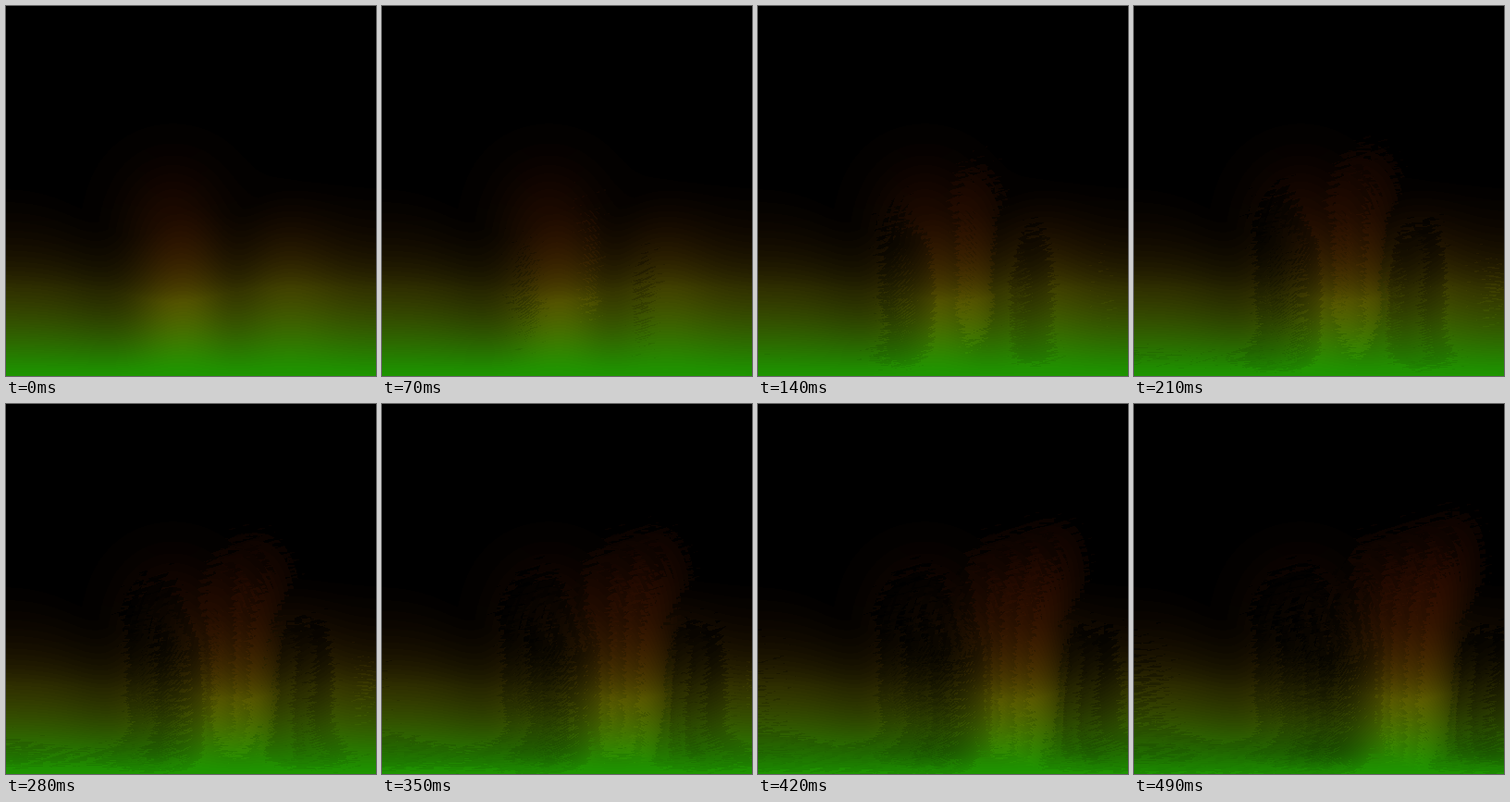
An HTML page with a canvas for the animation above (560 ms loop, 400 by 400 pixels).

```html
<!DOCTYPE html>
<html lang="en">
<head>
<meta charset="utf-8">
<title>Aurora</title>
<style>
  html, body { margin: 0; width: 100%; height: 100%; overflow: hidden; background: #000; }
  canvas { display: block; width: 100vw; height: 100vh; }
</style>
</head>
<body>
<canvas id="stage" width="400" height="400"></canvas>
<script>
const SIZE = 400, STEPS = 8, STEP_MS = 70;
const ctx = document.getElementById('stage').getContext('2d');

const bell = (d, width) => Math.exp(-d * d / (2 * width * width));
const plateau = (s, top) => Math.exp(-Math.pow(s / top, 5));

function hash(a, b) {
  const n = Math.sin(a * 127.1 + b * 311.7) * 43758.5453;
  return n - Math.floor(n);
}

// Values shared by a whole column at step k.
function columnAt(x, k) {
  const q = k / (STEPS - 1);
  const trough = bell(x - 135 - 13 * k, 45);
  const trough2 = bell(x - 245 - 18 * k, 25);
  const reach = 95 - 15 * q - 27 * trough - (14 + 6 * q) * trough2
    + 7 * q * bell(x - 10 - 12 * k, 30);
  return { q, reach, trough, ridge2: bell(x - 305 - 25 * k, 38) };
}

// Red and green of the light at height s above the ground.
function glow(x, s, k, { q, reach, trough, ridge2 }) {
  const lean = 6 * Math.pow(s / 260, 2);
  const d = x - 180 - k * (16.5 + lean);
  const ridge = bell(d, d < 0 ? 41 + 9 * q : 41 - 7 * q);
  const rise = 1 - Math.exp(-s / 40);

  let v = Math.max(0, 162 * Math.exp(-Math.pow(s / reach, 1.2)) - 12);
  v += rise * (41 + 19 * q) * ridge * plateau(s, 215 + 40 * q);
  v += rise * 20 * ridge2 * plateau(s, 175);
  v -= q * (22 + 14 * trough) * (1 - ridge) * bell(s - 20, 16);
  v = Math.max(0, Math.round(v / 3) * 3);

  const hue = 13 + 95 * Math.exp(-Math.pow(s / (120 - 20 * ridge), 1.6));
  return hue < 60 ? [v, v * hue / 60] : [v * (120 - hue) / 60, v];
}

// Light lingers until it has changed enough, leaving ragged trails.
function inertia(x, y) {
  const tooth = (y + x * 0.3) / 9;
  return 8 + 3 * hash(x >> 3, y >> 1) + 4 * (tooth - Math.floor(tooth));
}

function buildFrames() {
  const frames = [];
  for (let k = 0; k < STEPS; k++) {
    const image = ctx.createImageData(SIZE, SIZE);
    const px = image.data;
    if (k) px.set(frames[k - 1].data);
    for (let x = 0; x < SIZE; x++) {
      const column = columnAt(x, k);
      for (let y = 0; y < SIZE; y++) {
        const i = 4 * (y * SIZE + x);
        const [r, g] = glow(x, SIZE - y, k, column);
        const change = Math.max(Math.abs(r - px[i]), Math.abs(g - px[i + 1]));
        if (!k || change > inertia(x, y)) {
          px[i] = r;
          px[i + 1] = g;
        }
        px[i + 3] = 255;
      }
    }
    frames.push(image);
  }
  return frames;
}

const frames = buildFrames();
ctx.putImageData(frames[0], 0, 0);
const start = performance.now();

function draw() {
  const t = performance.now() - start;
  ctx.putImageData(frames[Math.floor(t / STEP_MS) % STEPS], 0, 0);
  requestAnimationFrame(draw);
}
requestAnimationFrame(draw);
</script>
</body>
</html>
```
